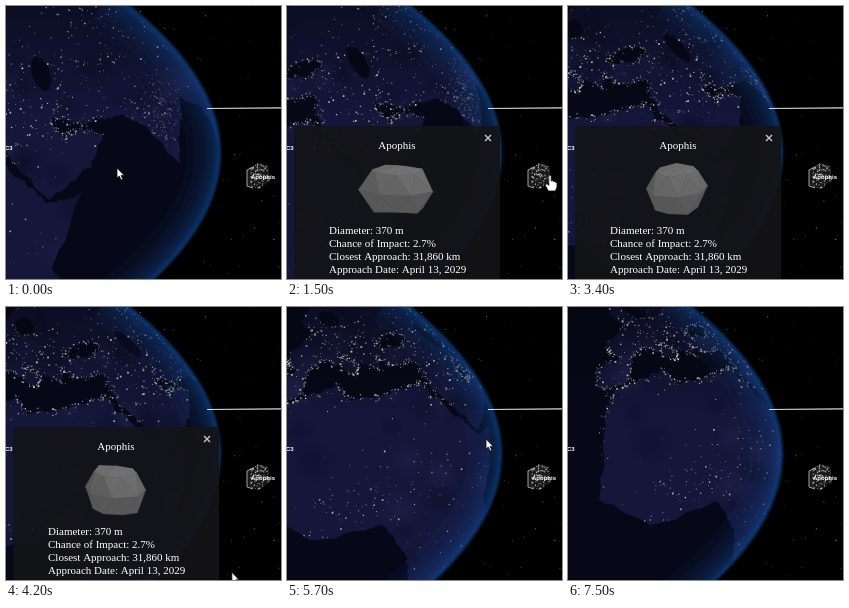
Write an HTML page with a canvas that moves like this. It is 275 px wide and 273 px high and loops after 7.6 s.

```html
<!DOCTYPE html>
<html>
<head>
<meta charset="utf-8">
<style>
html, body { margin: 0; width: 100%; height: 100%; overflow: hidden; background: #000 }
canvas { display: block }
</style>
</head>
<body>
<canvas id="stage" width="275" height="273"></canvas>
<script>
const c = document.getElementById('stage').getContext('2d');
const LOOP = 7600, STEP = 100, RAD = Math.PI / 180, TAU = 2 * Math.PI;
const SANS = '"Liberation Sans", Arial, sans-serif', SERIF = '"Liberation Serif", "Times New Roman", serif';

// Perspective view of the sphere: centre, radius, camera distance in radii
const CX = 52, CY = 152, R = 166, D = 2.3, F = R * Math.sqrt(D * D - 1);
const TILT = 21 * RAD, ROLL = 17 * RAD;
const SEA = '#060817', LAND = '#14163a';

let seed = 7;
const rnd = () => (seed = (seed * 16807) % 2147483647) / 2147483647;
const between = (a, b) => a + (b - a) * rnd();
const bell = () => rnd() + rnd() + rnd() - 1.5;
const many = (n, make) => Array.from({ length: n }, make);

// Coarse outlines as lon, lat pairs; the small bays come from seeded roughness
const africa = [-6,36, 10,37, 11,33, 20,31, 32,31, 37,21, 43,12, 51,12, 40,-4, 40,-16, 30,-31,
  19,-34, 12,-17, 13,-8, 9,4, -8,4.5, -17,14, -10,31];
const eurasia = [-9,37, -9,43, -1,44, -4,48, 8,54, 6,60, 20,70, 100,75, 130,43, 108,18, 100,5, 95,17,
  88,22, 80,14, 77.5,8, 72,20, 67,25, 57,26.5, 49,30, 51,25, 56,25.5, 60,22.5, 55,17, 44,13, 35,28,
  35,36, 27,37, 25,41, 23,37, 14,45, 18,40, 16,38, 9,44, 3,43, -1,37];
const innerSeas = [[34, 43.5, 6.5, 2], [51, 41, 2.5, 5], [19, 58, 4, 4]];

function coast(flat) {
  const n = flat.length / 2, at = i => flat.slice(i % n * 2, i % n * 2 + 2);
  return many(n * 8, (_, i) => {
    const [x0, y0] = at(i >> 3), [x1, y1] = at((i >> 3) + 1), u = i % 8 / 8;
    return [x0 + (x1 - x0) * u + bell() * .6, y0 + (y1 - y0) * u + bell() * .6];
  });
}
const lands = [africa, eurasia].map(coast);
const seas = innerSeas.map(([x, y, w, h]) => many(24, (_, i) =>
  [x + w * Math.cos(i / 24 * TAU) + bell() * .6, y + h * Math.sin(i / 24 * TAU) + bell() * .5]));

function inside(poly, x, y) {
  let hit = false;
  poly.forEach(([x1, y1], i) => {
    const [x2, y2] = poly[(i + 1) % poly.length];
    if ((y1 > y) !== (y2 > y) && x < (x2 - x1) * (y - y1) / (y2 - y1) + x1) hit = !hit;
  });
  return hit;
}
const onLand = (x, y) => lands.some(p => inside(p, x, y)) && !seas.some(p => inside(p, x, y));

// City lights scatter around a few populated centres and string along northern coasts
const lights = [];
const addLight = (x, y, dim = 1) => lights.push([x, y, between(.6, 1) + rnd() ** 4, dim * between(.3, .9)]);
[[12, 48, 15, 200], [46, 34, 13, 170], [77, 21, 9, 300], [75, 45, 20, 130], [3, 8, 10, 70], [20, 5, 22, 110]]
  .forEach(([lon, lat, spread, n]) => {
    while (n--) {
      const x = lon + bell() * spread * 1.4, y = lat + bell() * spread;
      if (onLand(x, y)) addLight(x, y, spread < 10 ? .6 : 1);
    }
  });
lands.flat().concat(seas[0]).forEach(([x, y]) => {
  if (y > 22 && y < 47 && x < 62)
    for (let k = 0; k < 4; k++) if (rnd() < .6) addLight(x + bell(), y + bell() * .8);
});

const patches = many(90, () => [between(-18, 110), between(-30, 62), between(8, 24), rnd() < .4]);
const stars = many(65, () => [between(125, 275), between(0, 273), between(.5, 1.2), between(.15, .65)]);
const specks = many(170, () => [between(244, 265), between(156, 184), between(.5, 1.4), between(.3, 1)]);

function project([lon, lat], lon0) {
  const a = (lon - lon0) * RAD, b = lat * RAD;
  const x = Math.cos(b) * Math.sin(a), n = Math.cos(b) * Math.cos(a), s = Math.sin(b);
  const y = s * Math.cos(TILT) - n * Math.sin(TILT), z = s * Math.sin(TILT) + n * Math.cos(TILT);
  const k = z < 1 / D ? R / Math.hypot(x, y) : F / (D - z);
  return [CX + k * (x * Math.cos(ROLL) - y * Math.sin(ROLL)),
          CY - k * (x * Math.sin(ROLL) + y * Math.cos(ROLL)), z];
}

function trace(points) {
  points.forEach(([x, y], i) => i ? c.lineTo(x, y) : c.moveTo(x, y));
  c.closePath();
}
function shape(points, color) {
  c.beginPath();
  trace(points);
  c.fillStyle = color;
  c.fill();
}
function square(x, y, s, color) {
  c.fillStyle = color;
  c.fillRect(x - s / 2, y - s / 2, s, s);
}
function text(s, x, y, font, align = 'left') {
  c.font = font;
  c.fillStyle = '#fff';
  c.textAlign = align;
  c.fillText(s, x, y);
}

const limb = new Path2D('M105 -13Q321 147 105 307');
const disc = new Path2D('M105 -13Q321 147 105 307H-5V-13Z');

function glow(from, to, alpha) {
  c.strokeStyle = `rgba(24,88,175,${alpha})`;
  for (let w = from; w > to; w *= .75) {
    c.lineWidth = w;
    c.stroke(limb);
  }
}

function globe(lon0) {
  const view = p => p.map(q => project(q, lon0));
  glow(7, 1, .12);
  c.save();
  c.clip(disc);
  c.fillStyle = SEA;
  c.fillRect(0, 0, 275, 273);

  c.save();
  c.beginPath();
  lands.forEach(p => trace(view(p)));
  c.fillStyle = LAND;
  c.fill();
  c.clip();
  patches.forEach(([lon, lat, r, pale]) => {
    const [x, y, z] = project([lon, lat], lon0);
    if (z < .45) return;
    const g = c.createRadialGradient(x, y, 0, x, y, r), col = pale ? '46,48,96' : '7,8,26';
    g.addColorStop(0, `rgba(${col},.28)`);
    g.addColorStop(1, `rgba(${col},0)`);
    square(x, y, 2 * r, g);
  });
  c.restore();
  seas.forEach(p => shape(view(p), SEA));

  const shade = c.createLinearGradient(0, 0, 0, 110);
  shade.addColorStop(0, 'rgba(4,5,14,.5)');
  shade.addColorStop(1, 'rgba(4,5,14,0)');
  c.fillStyle = shade;
  c.fillRect(0, 0, 275, 110);

  lights.forEach(([lon, lat, s, a]) => {
    const [x, y, z] = project([lon, lat], lon0);
    if (z > 1 / D) square(x, y, s, `rgba(228,220,194,${a * Math.min(1, z + .1)})`);
  });
  glow(64, 2, .06);
  c.restore();
}

function asteroidMark(labelled) {
  c.save();
  c.beginPath();
  trace([[241, 164], [252, 157], [262, 160], [264, 175], [253, 183], [241, 180]]);
  c.clip();
  c.fillStyle = '#181818';
  c.fillRect(240, 156, 26, 28);
  specks.forEach(([x, y, s, a]) => square(x, y, s, `rgba(225,225,225,${a})`));
  c.restore();
  c.strokeStyle = '#b4b4b4';
  c.lineWidth = .9;
  c.stroke(new Path2D('M247 161L241 164V180L247 182'));
  if (labelled) text('Apophis', 245, 173, 'bold 6px ' + SANS);
}

// Low-poly rock: rings of uneven vertices on an ellipsoid, turning about its upright axis
const RINGS = 4, SIDES = 7;
const rock = many(RINGS + 1, (_, i) => many(SIDES, (_, j) => {
  const a = i / RINGS * Math.PI, b = (j + i % 2 / 2) / SIDES * TAU;
  const k = i % RINGS ? between(.94, 1.08) : .88;
  return [37 * k * Math.sin(a) * Math.cos(b), -27 * k * Math.cos(a), 30 * k * Math.sin(a) * Math.sin(b)];
}));

function rockFace(p, q, r) {
  const u = q.map((n, i) => n - p[i]), w = r.map((n, i) => n - p[i]);
  const n = [u[1] * w[2] - u[2] * w[1], u[2] * w[0] - u[0] * w[2], u[0] * w[1] - u[1] * w[0]];
  const len = Math.hypot(...n) * (n[0] * p[0] + n[1] * p[1] + n[2] * p[2] < 0 ? -1 : 1);
  if (Math.abs(len) < 1e-6 || n[2] / len <= 0) return;
  const g = 88 + 32 * Math.max(0, (n[0] * .25 - n[1] * .7 + n[2] * .35) / len);
  c.strokeStyle = `rgb(${g},${g},${g})`;
  c.lineWidth = .6;
  shape([p, q, r].map(([x, y]) => [109 + x, 183 + y]), c.strokeStyle);
  c.stroke();
}

function drawRock(t) {
  const a = t / 1250 - 1.5, s = Math.sin(a), co = Math.cos(a);
  const v = rock.map(ring => ring.map(([x, y, z]) => {
    const depth = z * co - x * s;
    return [x * co + z * s, y * .97 + depth * .24, depth * .97 - y * .24];
  }));
  for (let i = 0; i < RINGS; i++) for (let j = 0; j < SIDES; j++) {
    const k = (j + 1) % SIDES, A = v[i], B = v[i + 1], odd = i % 2;
    rockFace(A[j], A[k], odd ? B[k] : B[j]);
    rockFace(odd ? A[j] : A[k], B[j], B[k]);
  }
}

function popup(t) {
  c.fillStyle = 'rgba(20,20,23,.93)';
  c.beginPath();
  c.roundRect(7, 120, 206, 160, 3);
  c.fill();
  text('Apophis', 110, 143, '11px ' + SERIF, 'center');
  c.strokeStyle = '#c8c8c8';
  c.lineWidth = 1.4;
  c.stroke(new Path2D('M198 129l6 6m0 -6l-6 6'));
  drawRock(t);
  ['Diameter: 370 m', 'Chance of Impact: 2.7%', 'Closest Approach: 31,860 km', 'Approach Date: April 13, 2029']
    .forEach((s, i) => text(s, 42, 228 + i * 13, '11px ' + SERIF));
}

const ARROW = new Path2D('M0 0V10L2.3 8L4 12L5.8 11.2L4.1 7.4H7.2Z');
const HAND = new Path2D('M-1.2 1Q0-1 1.2 1V6Q2.6 5 3.4 6.5Q5 5.8 5.4 7.3Q7 7 7 8.6V12L5.4 16H-1.6L-4.6 10.5Q-4.6 8.4-2.7 9L-1.2 10.4Z');
// start, end and destination of each pointer move
const moves = [[100, 900, 269, 174], [900, 1200, 263, 169], [2500, 3100, 228, 276],
  [4100, 4700, 199, 132], [6400, 7100, 120, 280]];

function pointer(t) {
  let x = 111, y = 162;
  moves.forEach(([t0, t1, tx, ty]) => {
    let u = Math.max(0, Math.min(1, (t - t0) / (t1 - t0)));
    u *= u * (3 - 2 * u);
    x += (tx - x) * u;
    y += (ty - y) * u;
  });
  const icon = t >= 1100 && t < 2600 || t >= 4600 && t < 5700 ? HAND : ARROW;
  c.save();
  c.translate(x, y);
  c.fillStyle = '#fff';
  c.strokeStyle = '#111';
  c.lineWidth = .8;
  c.fill(icon);
  c.stroke(icon);
  c.restore();
}

function draw(t) {
  c.fillStyle = '#000';
  c.fillRect(0, 0, 275, 273);
  stars.forEach(([x, y, s, a]) => square(x, y, s, `rgba(215,215,195,${a})`));
  globe(48.5 - 7.8 * t / 1000);
  c.strokeStyle = '#d8d8d8';
  c.lineWidth = 1.2;
  c.stroke(new Path2D('M201 102.5L275 101.8'));
  text('C3', -1, 144, 'bold 6px ' + SANS);
  asteroidMark(t < 1100 || t >= 2600);
  if (t >= 1400 && t < 5700) popup(t);
  pointer(t);
}

function tick(now) {
  draw(Math.floor(now % LOOP / STEP) * STEP);
  requestAnimationFrame(tick);
}
requestAnimationFrame(tick);
</script>
</body>
</html>
```
